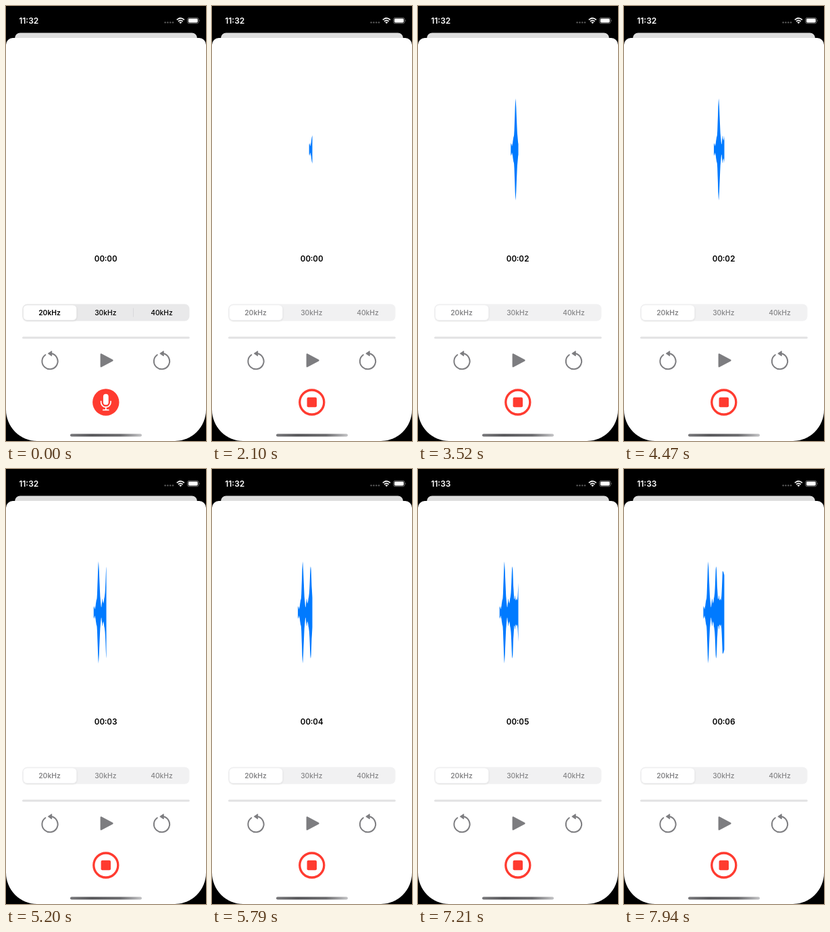
These frames come from a looping animation (296x640 px, 8 s). An HTML page:

```html
<!DOCTYPE html>
<html lang="en">
<head>
<meta charset="utf-8">
<title>Voice recorder</title>
<style>
  html, body { margin: 0; width: 100%; height: 100%; overflow: hidden; background: #000; }
  svg { display: block; width: 296px; height: 640px; }
  text { font-family: Inter, Roboto, sans-serif; font-weight: 600; }
  #timer { font-size: 11.8px; text-anchor: middle; font-variant-numeric: tabular-nums; }
  #labels { font-size: 10.3px; font-weight: 500; text-anchor: middle; }
  #labels text { font-weight: inherit; }
  #labels .on { font-weight: 600; }
  .line { fill: none; stroke-linecap: round; stroke-linejoin: round; }
  .recording #mic, #stop { display: none; }
  .recording #stop { display: inline; }
  .recording #track { fill: #f1f1f2; }
  .recording #thumb { stroke: #ededee; }
  .recording #labels { fill: #858587; }
  .recording #divider { display: none; }
</style>
</head>
<body>
<svg id="stage" viewBox="0 0 296 640">
  <defs>
    <linearGradient id="bar">
      <stop offset="0" stop-color="#77777a"/>
      <stop offset=".3" stop-color="#555558"/>
      <stop offset=".7" stop-color="#6a6a6d"/>
      <stop offset="1" stop-color="#c4c4c6"/>
    </linearGradient>
    <filter id="shade" x="-10%" y="-20%" width="120%" height="150%">
      <feDropShadow dx="0" dy="1" stdDeviation="1" flood-opacity=".12"/>
    </filter>
    <g id="rewind">
      <path class="line" stroke="#7d7d80" stroke-width="2" d="M2.5 -11.3A11.6 11.6 0 1 1 -6.4 -9.4"/>
      <path fill="#7d7d80" stroke="#7d7d80" stroke-linejoin="round" d="M-2.4 -11.3L3 -14.9V-7.7Z"/>
    </g>
  </defs>

  <rect width="296" height="640"/>
  <rect x="13" y="39.5" width="270" height="30" rx="8" fill="#dedede"/>
  <path fill="#fff" d="M0 57A10 10 0 0 1 10 47H286A10 10 0 0 1 296 57V594A46 46 0 0 1 250 640H46A46 46 0 0 1 0 594Z"/>

  <text id="clock" x="19.2" y="25.8" font-size="12" fill="#fff">11:32</text>
  <g fill="#555">
    <circle cx="235.6" cy="24.3" r="1.2"/><circle cx="239.4" cy="24.3" r="1.2"/>
    <circle cx="243.2" cy="24.3" r="1.2"/><circle cx="247" cy="24.3" r="1.2"/>
  </g>
  <g class="line" stroke="#fff" stroke-width="1.7" style="stroke-linecap:butt">
    <path d="M252.8 20.3Q258.3 15.5 263.8 20.3M254.9 22.6Q258.3 19.7 261.7 22.6"/>
  </g>
  <path fill="#fff" d="M258.3 26L256.2 23.9Q258.3 22.4 260.4 23.9Z"/>
  <rect x="268.6" y="17.3" width="16.4" height="8.4" rx="2.5" fill="none" stroke="#777" stroke-width=".9"/>
  <rect x="269.9" y="18.6" width="13.8" height="5.8" rx="1.4" fill="#fff"/>
  <path fill="#888" d="M286 20Q287.3 21.5 286 23Z"/>

  <path id="wave" fill="#007aff"/>
  <text id="timer" x="147.7" y="375.6">00:00</text>

  <rect id="track" x="24.5" y="438.5" width="247" height="25" rx="7" fill="#e9e9ea"/>
  <rect id="thumb" x="25.5" y="440" width="79" height="22.3" rx="5.5" fill="#fff" stroke="#e2e2e3" stroke-width=".5" filter="url(#shade)"/>
  <path id="divider" d="M188.5 444.5V457.5" stroke="#d4d4d6" stroke-width=".8"/>
  <g id="labels">
    <text class="on" x="64.5" y="455">20kHz</text>
    <text x="147.3" y="455">30kHz</text>
    <text x="230.5" y="455">40kHz</text>
  </g>

  <rect x="24" y="486.4" width="247.8" height="3" rx="1.5" fill="#e2e2e3"/>
  <use href="#rewind" x="64.7" y="522.6"/>
  <use href="#rewind" x="230.2" y="522.6"/>
  <path fill="#7d7d80" stroke="#7d7d80" stroke-width="2.4" stroke-linejoin="round" d="M140.8 512.6V530.2L157.4 521.4Z"/>

  <g id="mic">
    <circle cx="147.8" cy="583" r="19.7" fill="#ff3b30"/>
    <rect x="143.9" y="570.8" width="7.8" height="16" rx="3.9" fill="#fff"/>
    <path class="line" stroke="#fff" stroke-width="1.7" d="M140.6 581.5V583A7.2 7.2 0 0 0 155 583V581.5M147.8 590.4V594.4M143.8 594.4H151.8"/>
  </g>
  <g id="stop" fill="#ff3b30">
    <circle cx="147.8" cy="583" r="18" fill="none" stroke="#ff3b30" stroke-width="3.3"/>
    <rect x="140.6" y="575.8" width="14.4" height="14.4" rx="2"/>
  </g>
  <rect x="95" y="629.6" width="106" height="4" rx="2" fill="url(#bar)"/>
</svg>
<script>
  const LOOP = 8, REC_START = 1.3, TIMER_START = 1.5, MINUTE_TURN = 6.7;
  const MID_Y = 211, RIGHT = 148.5, SPEED = 4.5;
  // Loudness: [distance from the first sample, half height]
  const LEVELS = [
    [0, 8], [.8, 9], [1.7, 4.5], [2.5, 8], [3.3, 14], [4.4, 18], [5.2, 26],
    [5.8, 45], [6.7, 70], [7.2, 74.5], [7.8, 66], [8.6, 46], [9.5, 26],
    [10.4, 15], [11.4, 7], [12.2, 12], [12.9, 22], [13.6, 17], [14.5, 11],
    [15.4, 19], [16.6, 25], [17.6, 44], [18.4, 65], [19, 69], [19.6, 63],
    [20.5, 37], [21.6, 19], [22.4, 20], [23, 28], [23.7, 18], [24.5, 20],
    [25.4, 21], [26.2, 18], [27, 26], [27.8, 44], [28.5, 63], [29.4, 61], [31, 55]
  ];
  const el = id => document.getElementById(id);
  const stage = el('stage'), wave = el('wave'), timer = el('timer'), clock = el('clock');

  function level(u) {
    const i = Math.max(1, LEVELS.findIndex(p => p[0] >= u));
    const [a, h] = LEVELS[i - 1], [b, k] = LEVELS[i];
    return h + (k - h) * (u - a) / (b - a);
  }

  function jag(n) {
    const r = Math.sin(n * 12.9898) * 43758.5453;
    return (r - Math.floor(r) - .5) * 3;
  }

  function wavePath(t) {
    const left = 143.7 - SPEED * (t - 2.1);
    const width = Math.min(RIGHT - left, 31);
    const top = [], bottom = [];
    const add = (u, n) => {
      const h = level(u) + jag(n), x = (left + u).toFixed(2);
      top.push(`${x} ${(MID_Y - h).toFixed(2)}`);
      bottom.unshift(`${x} ${(MID_Y + h).toFixed(2)}`);
    };
    let n = 0;
    for (; n * .4 < width; n++) add(n * .4, n);
    add(width, n);
    return `M${top.concat(bottom).join('L')}Z`;
  }

  function draw(t) {
    const recording = t >= REC_START;
    stage.classList.toggle('recording', recording);
    wave.setAttribute('d', recording ? wavePath(t) : '');
    const seconds = Math.max(0, Math.floor(t - TIMER_START));
    timer.textContent = '00:' + String(seconds).padStart(2, '0');
    clock.textContent = t < MINUTE_TURN ? '11:32' : '11:33';
  }

  const begin = performance.now();
  function tick() {
    draw((performance.now() - begin) / 1000 % LOOP);
    requestAnimationFrame(tick);
  }
  tick();
</script>
</body>
</html>
```
